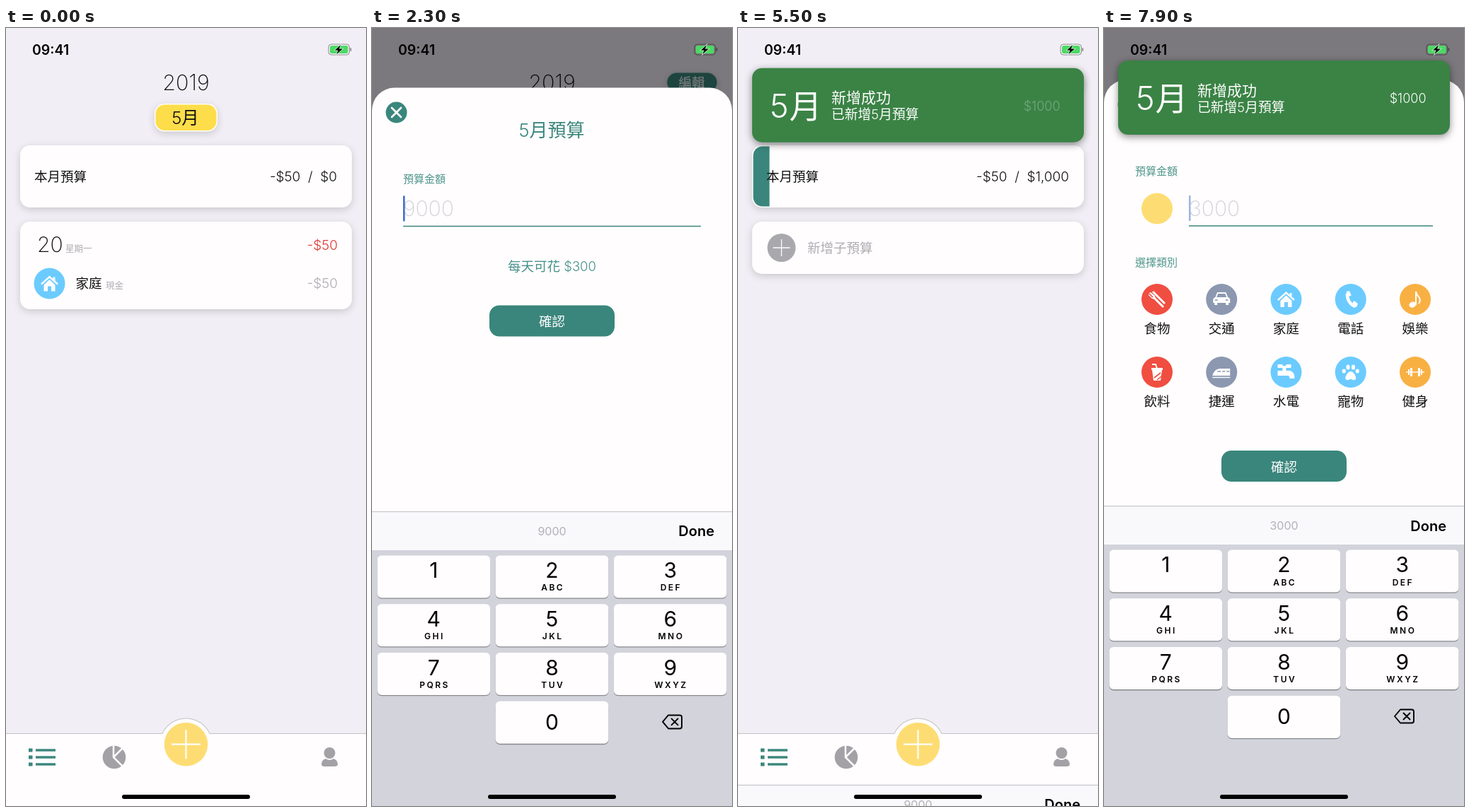
An HTML page with a canvas for the animation above (8000 ms loop, 509 px wide and 1101 px high).

```html
<!DOCTYPE html>
<html lang="zh-Hant">
<head>
<meta charset="utf-8">
<title>Budget app</title>
<style>
html, body { margin: 0; width: 100%; height: 100%; overflow: hidden; background: #f1eff5; }
canvas { display: block; width: 509px; height: 1101px; }
</style>
</head>
<body>
<canvas id="stage"></canvas>
<script>
const W = 509, H = 1101, LOOP = 8000, STEP = 100;
const TEAL = '#3a867c', PAPER = '#fffdfe', GRAY = '#aeacb1', YELLOW = '#fddd73', BLUE = '#6bcbff';
const FAMILY = 'Inter, "Noto Sans CJK TC", "Noto Sans CJK", sans-serif';

const canvas = document.getElementById('stage');
const ctx = canvas.getContext('2d');
const dpr = window.devicePixelRatio || 1;
canvas.width = W * dpr;
canvas.height = H * dpr;

// ---- helpers ----
const clamp = v => Math.max(0, Math.min(1, v));

function ease(t, start, speed) {
  const x = Math.max(0, t - start) / 1000 * speed;
  return 1 - (1 + x) * Math.exp(-x);
}

function bounce(t, start) {
  const x = Math.max(0, t - start) / 1000, z = 0.75, w = 15;
  const r = Math.sqrt(1 - z * z), a = w * r * x;
  return 1 - Math.exp(-z * w * x) * (Math.cos(a) + z / r * Math.sin(a));
}

function faded(alpha, draw) {
  if (alpha <= 0) return;
  ctx.save();
  ctx.globalAlpha *= alpha;
  draw();
  ctx.restore();
}

function shifted(x, y, draw) {
  ctx.save();
  ctx.translate(x, y);
  draw();
  ctx.restore();
}

function text(str, x, y, size, color = '#111', weight = 300, align = 'left') {
  ctx.font = `${weight} ${size}px ${FAMILY}`;
  ctx.textAlign = align;
  ctx.fillStyle = color;
  ctx.fillText(str, x, y);
  return ctx.measureText(str).width;
}

function rect(x, y, w, h, color) {
  ctx.fillStyle = color;
  ctx.fillRect(x, y, w, h);
}

function round(x, y, w, h, r, color) {
  ctx.beginPath();
  ctx.roundRect(x, y, w, h, r);
  ctx.fillStyle = color;
  ctx.fill();
}

function disc(x, y, r, color) {
  ctx.beginPath();
  ctx.arc(x, y, r, 0, Math.PI * 2);
  ctx.fillStyle = color;
  ctx.fill();
}

function stroke(path, width, color, cap = 'butt') {
  ctx.lineWidth = width;
  ctx.lineCap = cap;
  ctx.strokeStyle = color;
  ctx.stroke(new Path2D(path));
}

function shape(path, color) {
  ctx.fillStyle = color;
  ctx.fill(new Path2D(path));
}

function plus(x, y, r, width) {
  stroke(`M${x - r},${y}H${x + r}M${x},${y - r}V${y + r}`, width, PAPER);
}

function card(x, y, w, h, color = PAPER, r = 14, dark = 0.17) {
  ctx.save();
  ctx.shadowColor = `rgba(0,0,0,${dark})`;
  ctx.shadowBlur = 11 * dpr;
  ctx.shadowOffsetY = 3 * dpr;
  round(x, y, w, h, r, color);
  ctx.restore();
}

// ---- category icons: fill, line, line width, cut-out line ----
const ICONS = {
  house: ['M-8,2L0,-5.5L8,2V11H2.5V4H-2.5V11H-8ZM5,-9h3v6l-3,-2.5z', 'M-11.5,1L0,-9.5L11.5,1', 2.4, ''],
  food: ['M-11,-9l2,-1l6,5l1,5l-5,-1l-5,-5z', 'M-4,-2L9,11M-6,-11L11,6', 3, 'M-11,-8l5,5'],
  car: ['M-9,-3H9Q12,-2 12,1V5H10V8H6V5H-6V8H-10V5H-12V1Q-12,-2 -9,-3Z', 'M-8,-3L-5.5,-9H5.5L8,-3', 1.8, 'M-9.5,1h4M5.5,1h4'],
  phone: ['M-6,-11l4,-1l3,6l-3,2l-4,-1zM3,4l2,-2l5,4l-1,4l-4,2z', 'M-5,-8Q-5,5 6,10', 4.2, ''],
  note: ['M1,8A5,4 -20 1 1 1,6Z', 'M1,8V-11Q2,-6 6,-2Q8,2 5,6', 2, ''],
  drink: ['M-7,-3H7L5,12H-5ZM-8,-6H8V-3H-8Z', 'M0,-5L-2,-11H-7', 2, 'M-4,8L5,1M0,11L6,6'],
  train: ['M-13,5Q-10,-5 -2,-5H12V5Z', 'M-13,7.5H12', 1.4, 'M-6,-1H-1M1,-1H5M7,-1H11'],
  tap: ['M-12,-11H-5V-9H0V-11H7V-6H0V-2H6Q12,0 12,9H5Q5,5 2,5H-12V-2H-5V-6H-12Z', '', 1, ''],
  paw: ['M0,-1Q4,-1 7,6Q9,12 3,11Q0,9 -3,11Q-9,12 -7,6Q-4,-1 0,-1Z', 'M-9.5,-2v1M-3.7,-8v2M3.7,-8v2M9.5,-2v1', 5, ''],
  gym: ['M-7,-6h3v12h-3zM4,-6h3v12h-3zM-10,-4h2v8h-2zM8,-4h2v8h-2z', 'M-13,0H13', 1.4, '']
};

function icon(name, x, y, color) {
  const [fill, line, width, cut] = ICONS[name];
  disc(x, y, 22, color);
  shifted(x, y, () => {
    shape(fill, PAPER);
    stroke(line, width, PAPER, name === 'paw' ? 'round' : 'butt');
    stroke(cut, 1.6, color);
  });
}

const CATEGORIES = [
  ['food', '食物', '#f04e41'], ['car', '交通', '#8b98b0'], ['house', '家庭', BLUE],
  ['phone', '電話', BLUE], ['note', '娛樂', '#f8b043'],
  ['drink', '飲料', '#f04e41'], ['train', '捷運', '#8b98b0'], ['tap', '水電', BLUE],
  ['paw', '寵物', BLUE], ['gym', '健身', '#f8b043']
];

// ---- pages ----
function listCard() {
  card(20, 274, 469, 124);
  text('20', 44, 317, 30, '#111', 200);
  text('星期一', 84, 317, 12.5, GRAY);
  text('-$50', 469, 314, 19, '#e0372f', 300, 'right');
  icon('house', 61.5, 361.5, BLUE);
  text('家庭', 98.5, 368, 18.5);
  text('現金', 141, 369, 12.5, GRAY);
  text('-$50', 469, 368, 19, GRAY, 300, 'right');
}

function budgetCard() {
  round(211.5, 108.5, 86, 36.5, 13, YELLOW);
  card(20, 274, 469, 74);
  disc(61.5, 311, 20, '#a9a8ac');
  plus(61.5, 311, 12, 1.3);
  text('新增子預算', 98, 318, 18.5, GRAY);
  card(416.5, 62.8, 72, 28.4, '#d5e3e2', 14.2);
  round(417.3, 63.6, 70.4, 26.8, 13.4, TEAL);
  text('編輯', 452, 84, 18.5, PAPER, 300, 'center');
}

function page(t) {
  const saved = t >= 5300;
  const open = clamp((t - 900) / 200);
  rect(0, 0, W, H, '#f1eff5');
  text('2019', 254.5, 88, 30.5, '#111', 200, 'center');
  card(210, 107, 89, 39.5, PAPER, 14);
  round(211.5, 108.5, 86, 36.5, 13, '#fedd4a');

  card(20, 166, 469, 88);
  if (saved) round(21.5, 167.5, 23, 85, [13, 0, 0, 13], TEAL);
  text('本月預算', 40, 217, 18.5);
  text(`-$50  /  ${saved ? '$1,000' : '$0'}`, 468, 217, 19, '#111', 300, 'right');
  faded(1 - open, listCard);
  faded(open, budgetCard);
  text('5月', 253.5, 136, 24.5, '#111', 300, 'center');
}

function tabBar() {
  rect(0, 999, W, 102, PAPER);
  rect(0, 998, W, 1, '#c2c1c5');
  disc(254.5, 1014, 37.5, '#c2c1c5');
  disc(254.5, 1014, 36.5, PAPER);
  rect(214, 999, 81, 60, PAPER);
  disc(254.5, 1013.7, 30.8, YELLOW);
  plus(254.5, 1013.7, 20.5, 2.2);

  for (const y of [1022, 1032, 1042]) {
    rect(32, y - 2.5, 5.5, 5, TEAL);
    rect(42, y - 1.7, 28, 3.4, TEAL);
  }
  const gray = '#a3a1a5';
  disc(153, 1032, 16.3, gray);
  stroke('M152,1014V1032L166,1046M152,1032L166,1018', 2.5, PAPER);
  disc(457.5, 1026, 8, gray);
  shape('M452,1034Q457.5,1038 463,1034Q469,1036 469,1042Q469,1045 465,1045H450Q446,1045 446,1042Q446,1036 452,1034Z', gray);
}

function statusBar() {
  text('09:41', 37, 37.5, 19.5, '#000', 600);
  ctx.beginPath();
  ctx.roundRect(456, 23, 29.5, 15, 4);
  ctx.lineWidth = 1;
  ctx.strokeStyle = 'rgba(0,0,0,0.42)';
  ctx.stroke();
  round(458, 25, 25.5, 11, 2.5, '#4cd964');
  round(486.5, 28, 1.8, 5, 1, 'rgba(0,0,0,0.42)');
  const bolt = 'M473,24L465,31.5H469.5L467.5,37L476,29.5H471Z';
  stroke(bolt, 1.4, '#d8f5dd');
  shape(bolt, '#000');
}

// ---- sheets ----
function sheetFrame(title) {
  round(0, 73, W, H, [32, 32, 0, 0], PAPER);
  disc(34.5, 108, 15, TEAL);
  stroke('M28,101.5l13,13m0,-13l-13,13', 2.7, PAPER, 'round');
  text(title, 254, 143, 26, TEAL, 300, 'center');
  text('預算金額', 44, 208, 15, '#4f968b');
}

function field(x, y, value, hint, caret) {
  const width = text(value || hint, x, y, 30, value ? '#111' : '#d3d2d8', 200);
  rect(x, y + 13.3, 465 - x, 1.5, TEAL);
  faded(caret, () => rect(x + (value ? width : 0), y - 29, 2.5, 36, '#3f6bc9'));
}

function confirm(y, alpha = 1) {
  round(166, y, 177, 44, 14, TEAL);
  faded(alpha, () => text('確認', 254.5, y + 29.5, 18.5, PAPER, 300, 'center'));
}

const PRESSES = [[3400, '1'], [3900, '0'], [4200, '0'], [4600, '0']];

function monthSheet(t) {
  const count = PRESSES.filter(p => t >= p[0] + 100).length;
  const value = '1000'.slice(0, count);
  const amount = Number(value || 9000);
  const caret = t < 3100 || t >= 3400 ? 1 : t < 3200 ? 0.5 : 0;
  sheetFrame('5月預算');
  field(44, 255, value, '9000', caret);
  const about = amount % 30 ? '約' : '';
  text(`每天${about}可花 $${Math.floor(amount / 30)}`, 254.5, 332.5, 18.5, '#45918a', 300, 'center');
  confirm(381, t >= 5200 ? 0.4 : 1);
}

function categorySheet(t) {
  sheetFrame('新增子預算');
  disc(75, 255.5, 22, YELLOW);
  field(120, 266, '', '3000', t >= 7900 ? 0.5 : 1);
  text('選擇類別', 44, 336.5, 15, '#4f968b');
  CATEGORIES.forEach(([name, label, color], i) => {
    const x = 75 + i % 5 * 91.25, y = i < 5 ? 384 : 487;
    icon(name, x, y, color);
    text(label, x, y + 47.5, 18.5, '#111', 300, 'center');
  });
  confirm(598);
}

// ---- keyboard ----
const LETTERS = ['', 'ABC', 'DEF', 'GHI', 'JKL', 'MNO', 'PQRS', 'TUV', 'WXYZ'];

function key(digit, col, row, letters, press) {
  const x = 7.5 + col * 167.2, y = 738.5 + row * 68.8, mid = x + 79.8;
  round(x, y + 1.3, 159.6, 60, 6, '#898a8e');
  round(x, y, 159.6, 60, 6, PAPER);
  faded(press, () => round(x, y, 159.6, 60, 6, '#b8c2d4'));
  text(digit, mid, y + (row < 3 ? 31.5 : 40), 30, '#000', 400, 'center');
  ctx.letterSpacing = '2.5px';
  text(letters, mid + 1.2, y + 50, 12, '#000', 600, 'center');
  ctx.letterSpacing = '0px';
}

function keyboard(t, hint) {
  const hit = PRESSES.find(p => t >= p[0] && t < p[0] + 200);
  const strength = hit ? 1 - (t - hit[0]) / 200 : 0;
  const press = d => hit && hit[1] === d ? strength : 0;
  rect(0, 677, W, 54, '#f9f8fb');
  rect(0, 676, W, 1.2, '#c6c5ca');
  text(hint, 254.5, 710, 16, '#b3b2b7', 400, 'center');
  text('Done', 484, 711.5, 20, '#000', 600, 'right');
  rect(0, 731, W, 370, '#d2d3db');
  LETTERS.forEach((s, i) => key(String(i + 1), i % 3, Math.floor(i / 3), s, press(String(i + 1))));
  key('0', 1, 3, '', press('0'));
  ctx.lineJoin = 'round';
  stroke('M419,964.5H435Q438,964.5 438,967.5V980.5Q438,983.5 435,983.5H419L411,974ZM423.5,969.5l9,9m0,-9l-9,9', 1.9, '#000', 'round');
  ctx.lineJoin = 'miter';
}

// ---- success banner ----
function banner(t) {
  if (t < 5200) return;
  const leave = clamp((t - 7800) / 100);
  const y = -115 + 168.5 * bounce(t, 5230) - 7.5 * leave * leave;
  shifted(0, y, () => {
    card(20, 0, 469, 105, '#3a8345', 14, 0.45);
    text('5', 45, 70, 46, PAPER, 300);
    text('月', 72.5, 70, 46, PAPER, 300);
    text('新增成功', 132, 49.5, 21, PAPER, 500);
    text('已新增5月預算', 132, 72.5, 18.8, PAPER, 300);
    faded(clamp((t - 5400) / 330), () => text('$1000', 455.5, 60, 18, PAPER, 300, 'right'));
  });
}

function draw(t) {
  ctx.setTransform(dpr, 0, 0, dpr, 0, 0);
  ctx.textBaseline = 'alphabetic';
  page(t);
  tabBar();

  const second = t >= 6800;
  const dim = second ? clamp((t - 6800) / 100)
    : clamp((t - 1700) / 200) * (1 - clamp((t - 5270) / 200));
  faded(dim, () => rect(0, 0, W, H, 'rgba(3,0,4,0.495)'));

  const sheetUp = second ? ease(t, 6836, 21) : ease(t, 1990, 21) - ease(t, 5262, 24);
  const keysUp = second ? ease(t, 6820, 18) : ease(t, 1971.5, 18) - ease(t, 5258, 18);
  if (sheetUp > 0.001) {
    shifted(0, 1028 * (1 - sheetUp), () => (second ? categorySheet : monthSheet)(t));
  }
  if (keysUp > 0.001) {
    shifted(0, 424 * (1 - keysUp), () => keyboard(t, second ? '3000' : '9000'));
  }
  banner(t);
  statusBar();
  round(164, 1085, 181, 6, 3, '#000');
}

const begin = performance.now();
function tick() {
  const t = (performance.now() - begin) % LOOP;
  draw(Math.floor(t / STEP) * STEP);
  requestAnimationFrame(tick);
}
tick();
</script>
</body>
</html>
```
